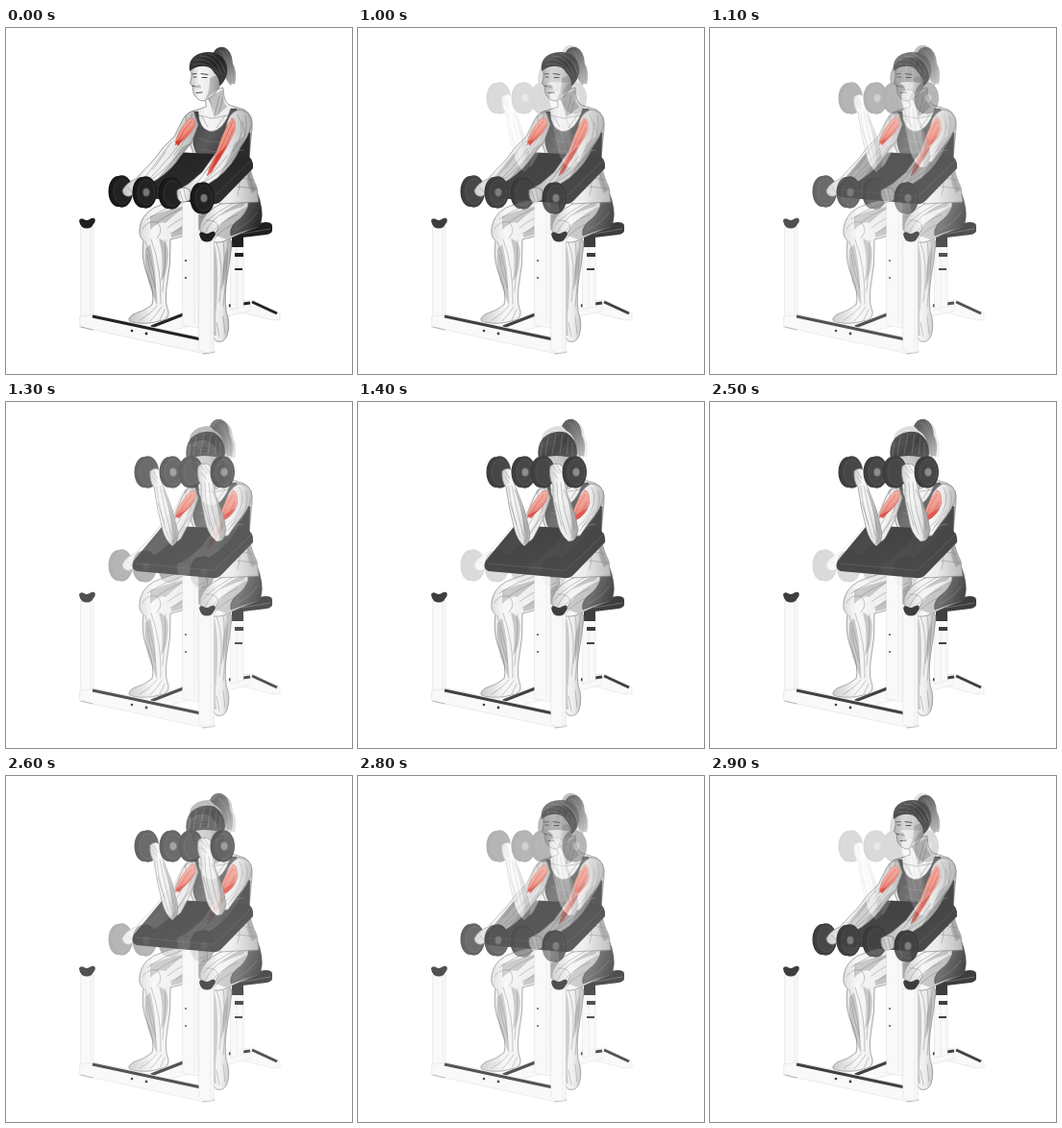
An HTML page for the animation above (3 s loop, 360 by 360 pixels).

```html
<!DOCTYPE html>
<html lang="en">
<head>
<meta charset="utf-8">
<title>Preacher curl</title>
<style>
html, body { margin: 0; width: 100%; height: 100%; overflow: hidden; background: #fff; }
svg { display: block; width: 100%; height: 100%; }
.down { animation: down 3s infinite; }
.up { animation: up 3s infinite; }
/* Six-step crossfade up, five-step crossfade back */
@keyframes down {
  0% { opacity: 1; animation-timing-function: step-end; }
  33.33% { opacity: 1; animation-timing-function: steps(6, start); }
  53.33% { opacity: 0; animation-timing-function: step-end; }
  83.33% { opacity: 0; animation-timing-function: steps(5, start); }
  100% { opacity: .8333; }
}
@keyframes up {
  0% { opacity: 0; animation-timing-function: step-end; }
  33.33% { opacity: 0; animation-timing-function: steps(6, start); }
  53.33% { opacity: 1; animation-timing-function: step-end; }
  83.33% { opacity: 1; animation-timing-function: steps(5, start); }
  100% { opacity: .1667; }
}
path, ellipse, circle { stroke-linecap: round; stroke-linejoin: round; }
.skin { fill: url(#skin); stroke: #777; stroke-width: .7; }
.fibre { fill: none; stroke: #666; stroke-width: .6; opacity: .7; }
.shade { fill: #555; opacity: .32; }
.cloth { fill: url(#cloth); stroke: #333; stroke-width: .5; }
.seam { fill: none; stroke: #777; stroke-width: .6; }
.hair { fill: url(#hair); }
.tail { fill: url(#tailFill); }
.strand { fill: none; stroke: #777; stroke-width: .5; }
.red { fill: url(#red); stroke: #c9584b; stroke-width: .4; }
.redline { fill: none; stroke: #c23c30; stroke-width: .7; opacity: .7; }
.deep { fill: #d33d32; }
.steel { fill: #f8f8f8; stroke: #dcdcdc; stroke-width: .6; }
.rim { fill: none; stroke: #ddd; stroke-width: .6; }
.strip { fill: none; stroke: #222; stroke-width: 3; stroke-linecap: butt; }
.black { fill: #1f1f1f; }
.ink { fill: none; stroke: #333; stroke-width: .9; }
</style>
</head>
<body>
<svg viewBox="0 0 360 360">
<defs>
  <linearGradient id="skin">
    <stop offset="0" stop-color="#c4c4c4"/><stop offset=".3" stop-color="#f6f6f6"/>
    <stop offset=".65" stop-color="#eaeaea"/><stop offset="1" stop-color="#adadad"/>
  </linearGradient>
  <linearGradient id="cloth" x2="1" y2=".5">
    <stop offset="0" stop-color="#3c3c3c"/><stop offset=".45" stop-color="#5c5c5c"/><stop offset="1" stop-color="#2b2b2b"/>
  </linearGradient>
  <linearGradient id="hair" x2="1" y2="1">
    <stop offset="0" stop-color="#444"/><stop offset=".5" stop-color="#222"/><stop offset="1" stop-color="#444"/>
  </linearGradient>
  <linearGradient id="tailFill" x2=".4" y2="1">
    <stop offset="0" stop-color="#333"/><stop offset=".5" stop-color="#666"/><stop offset="1" stop-color="#aaa"/>
  </linearGradient>
  <linearGradient id="red" x2=".4" y2="1">
    <stop offset="0" stop-color="#f4b5a8"/><stop offset=".6" stop-color="#ee8f80"/><stop offset="1" stop-color="#d94d40"/>
  </linearGradient>
  <linearGradient id="pad" x2=".6" y2="1">
    <stop offset="0" stop-color="#222"/><stop offset="1" stop-color="#2e2e2e"/>
  </linearGradient>

  <g id="plate">
    <ellipse cx="-2.5" rx="10" ry="16" fill="#151515"/>
    <ellipse cx="1.5" rx="11.5" ry="16.7" fill="#1b1b1b"/>
    <ellipse cx="2" rx="9" ry="13.3" fill="#222" stroke="#3d3d3d" stroke-width=".7"/>
  </g>
  <g id="capped">
    <use href="#plate"/>
    <ellipse cx="2" rx="3.6" ry="4.3" fill="#777" stroke="#444" stroke-width=".8"/>
  </g>

  <path id="hook" class="black" d="M0 2Q2-1 5 1Q8 3 11 1Q14-1 16 0Q18 3 15 6L13 9Q8 12 3 9L1 6Z"/>

  <g id="seat">
    <path class="steel" d="M238 284L256 283L285 297V303L278 304L238 294Z"/>
    <path class="strip" d="M256 285L282 297"/>
    <path class="steel" d="M150 311L186 297L254 286V294L152 320Z"/>
    <path class="strip" d="M151 311L187 297M232 289L254 286"/>
    <path class="steel" d="M234 222H247V290L234 293Z"/>
    <path class="rim" d="M240 228V291"/>
    <path class="black" d="M235 214H247V228H235ZM238 234H247V238H238ZM238 250H246V252H238Z"/>
    <path class="black" d="M230 208L270 202Q277 202 277 206V211Q276 214 271 215L246 218Q232 218 230 214Z"/>
    <path class="seam" d="M246 214L275 209" stroke="#555"/>
  </g>

  <g id="legs">
    <path class="skin" d="M213 211Q232 210 235 224Q233 243 230 260Q227 279 229 295Q234 308 230 320Q227 328 219 326Q213 321 214 309Q216 292 212 277Q204 250 205 229Z"/>
    <path class="shade" d="M216 222Q222 240 219 290Q217 300 219 320L214 320V222ZM230 228Q232 246 226 270Q223 250 230 228Z"/>
    <path class="fibre" d="M218 220Q228 243 222 285M225 216Q230 240 224 272M231 222Q231 240 226 290M219 306L222 321M226 300L228 318"/>
    <path class="skin" d="M207 171Q175 178 154 187Q140 195 139 209Q138 217 143 221Q140 242 148 259Q155 276 152 288Q145 294 132 298Q125 303 130 306Q147 309 159 305Q170 304 169 295Q165 286 167 270Q172 245 171 220Q191 216 211 204Z"/>
    <path class="shade" d="M150 196Q162 191 190 184Q176 193 166 203Q160 200 150 210ZM159 219Q171 222 168 243Q167 258 161 264Q165 240 159 219ZM150 225Q157 250 156 287L152 275Q143 255 145 230ZM172 214Q190 200 208 190L208 204Q190 214 172 218Z"/>
    <path class="fibre" d="M207 181Q176 188 157 202M207 188Q184 195 168 208M204 196Q186 207 171 214M192 179Q166 186 147 199M142 209Q147 200 157 202Q165 210 157 219M145 222Q155 250 157 287M151 220Q162 249 161 287M166 221Q166 246 163 274M147 236Q149 252 155 270M157 289Q151 297 139 304M162 290Q157 298 150 305M165 293L160 304"/>
    <path class="skin" d="M260 174Q270 194 262 207Q242 214 231 220Q222 225 211 222Q200 218 202 204Q207 191 222 184Q239 174 254 173Z"/>
    <path class="shade" d="M216 215Q224 199 250 186L258 206L229 220ZM222 196Q234 185 252 179L246 186Q234 189 222 196Z"/>
    <path class="fibre" d="M208 212Q214 195 248 180M211 217Q222 201 241 194M205 205Q218 190 246 178M217 219Q225 208 242 202M208 200Q220 199 221 208Q219 216 210 216"/>
    <path class="cloth" d="M249 168Q261 165 264 179Q269 197 263 207Q250 210 234 216Q232 209 239 202Q250 194 252 185Q253 177 249 168Z"/>
    <path class="seam" d="M239 210Q252 205 261 192"/>
  </g>

  <g id="frame">
    <path class="steel" d="M78 207H91V301H78Z"/>
    <path class="rim" d="M88 208V300"/>
    <path class="steel" d="M77 300L92 298L216 325V338L207 339L77 311Z"/>
    <path class="strip" d="M90 300L203 324"/>
    <path class="seam" d="M78 311L90 314M205 339L217 337"/>
    <path class="steel" d="M184 180H200V312L184 309Z"/>
    <path class="rim" d="M196 183V308"/>
    <path class="steel" d="M201 221H216V337L208 338L201 335Z"/>
    <path class="rim" d="M213 222V337"/>
    <g class="black"><circle cx="131" cy="315" r="1.3"/><circle cx="146" cy="318" r="1.4"/><circle cx="187" cy="242" r=".9"/><circle cx="187" cy="260" r=".9"/></g>
    <use href="#hook" x="76" y="198"/>
    <use href="#hook" x="201" y="212"/>
  </g>

  <g id="bench">
    <path d="M162 130Q164 128 168 128.500L250 133Q258 135 257 146L225 179Q221 184 214 183L136 176Q129 173 133 165Z" fill="url(#pad)"/>
    <path d="M135 168L211 175Q217 176 220 172L255 138" fill="none" stroke="#484848" stroke-width=".8"/>
  </g>

  <g id="torso">
    <path class="skin" d="M207 68L226 62Q226 76 232 80L248 85Q257 90 256 104L253 135Q253 150 261 166L263 181L222 183L197 135L185 105Q182 90 196 86L208 82Z"/>
    <path class="shade" d="M209 73L226 64Q225 78 230 82L218 92Q216 82 209 73ZM253 140Q254 155 261 168L256 172Q247 158 253 140Z"/>
    <path class="fibre" d="M211 72L217 92M222 71L217 91M226 72L221 90M196 90L215 94L245 88M204 92L210 103M228 91L219 104M240 139Q246 158 241 174M249 141Q253 158 258 169M236 145L252 149M239 155L257 158M240 165L259 167"/>
    <path class="cloth" d="M196 87L200 87Q200 105 213 108Q227 107 234 84L240 84Q242 105 254 109L253 136Q227 139 200 134Q192 120 196 109Z"/>
    <path class="seam" d="M201 115Q217 123 246 115M204 126Q222 132 247 127"/>
  </g>

  <g id="tail">
    <path class="tail" d="M215 27Q219 18 227 20Q235 23 236 37Q241 46 238 59Q235 56 234 60Q227 54 228 45Q228 36 220 32Z"/>
    <path class="strand" d="M222 24Q233 25 234 56M225 24Q231 37 231 54M228 22Q236 35 237 54"/>
  </g>

  <g id="lowered">
    <use href="#seat"/><use href="#legs"/><use href="#frame"/><use href="#torso"/>
    <use href="#tail"/>
    <path class="skin" d="M194 38Q192 44 193 51L191.500 58L194 60L195 68Q199 76 206 76L216 70L224 58L222 38L204 32Z"/>
    <path class="shade" d="M212 52L222 48L222 62L207 75Q213 64 212 52ZM198 60L202 59L203 63L198 62Z"/>
    <path class="ink" d="M194 48L198 47.500M203 47.500L210 48.500M195 51L198 51M204 51.500L209 51.500M194 60L197 61M198 67.500L204 67"/>
    <path class="hair" d="M191 45Q189 32 200 27Q214 22 225 30Q233 40 229 51Q226 58 222 60Q222 51 217 47Q214 41 208 40Q198 39 191 45Z"/>
    <path class="strand" d="M197 33Q213 30 222 49M202 29Q218 28 225 49M195 38Q210 34 219 46M210 26Q224 31 228 46"/>
    <use href="#bench"/>
    <use href="#plate" x="119" y="170"/>
    <path class="skin" d="M195 86Q186 88 181 101L175 113Q163 123 154 137L135 157Q125 161 121 169Q122 176 129 175L138 169L158 157Q173 147 181 134L193 119L200 101Z"/>
    <path class="shade" d="M195 118L181 134Q172 148 158 157Q172 140 183 124Z"/>
    <path class="fibre" d="M187 91Q190 106 180 120M193 90Q194 110 175 132M172 119L139 163M178 124Q163 144 141 165M181 130Q165 148 145 163M166 129L153 147M127 166L132 172"/>
    <path class="red" d="M190 95Q196 92 197 99Q194 110 184 117L176 122Q177 108 190 95Z"/>
    <path class="redline" d="M193 97Q183 107 179 119M196 101Q188 111 182 117"/>
    <path class="deep" d="M176 118L184 116L179 123Z"/>
    <path class="skin" d="M242 85Q256 86 256 100Q252 114 244 124Q237 142 220 156L200 169Q191 179 182 179Q177 175 180 168L190 162L204 150L219 129L229 104Q231 88 242 85Z"/>
    <path class="shade" d="M248 112L243 126Q236 143 220 156Q231 138 238 120Z"/>
    <path class="fibre" d="M241 90Q252 107 236 129M249 91Q254 114 237 135M246 98L249 112M222 131L196 165M230 133Q218 150 199 165M236 135Q225 150 205 161M217 137L206 151M182 170L188 174M185 167L191 171"/>
    <path class="red" d="M235 94Q240 94 238 107L231 122L214 150L209 154Q212 142 219 130Q225 109 235 94Z"/>
    <path class="redline" d="M236 97Q229 113 217 140M237 104Q231 119 222 134"/>
    <path class="deep" d="M219 133L230 122L222 136L212 150Z"/>
    <use href="#capped" x="144" y="171"/>
    <use href="#plate" x="171" y="172"/>
    <path class="skin" d="M178 169Q183 164 191 168L194 175Q191 182 182 181Q177 178 178 169Z"/>
    <path class="fibre" d="M181 170L184 180M185 168L188 180"/>
    <use href="#capped" x="204" y="177"/>
  </g>

  <g id="raised">
    <use href="#seat"/><use href="#legs"/><use href="#frame"/><use href="#torso"/>
    <use href="#tail" transform="translate(-3 -2)"/>
    <path class="skin" d="M191 50L193 65Q199 76 207 74L224 64L224 45Z"/>
    <path class="shade" d="M192 57H223L222 65L207 74L194 66Z"/>
    <path class="hair" d="M188 60Q185 46 193 37Q204 28 217 32Q228 39 228 53Q228 59 223 63Q223 58 218 57Q202 55 192 58Z"/>
    <path class="strand" d="M192 42L190 56M198 36L195 55M206 33L202 54M213 33L210 54M219 37L217 55M223 42L223 57"/>
    <use href="#bench"/>
    <path class="skin" d="M196 87Q186 90 181 104L173 123L169 140Q175 150 182 142L192 123L200 100Z"/>
    <path class="fibre" d="M187 93Q190 112 174 133M194 91Q197 112 178 138M192 118L176 142"/>
    <path class="red" d="M192 93Q199 90 197 99Q193 112 176 121Q177 108 192 93Z"/>
    <path class="redline" d="M193 97Q184 107 179 119M196 102Q189 112 181 119"/>
    <path class="deep" d="M176 118L188 112L180 121Z"/>
    <use href="#plate" x="146" y="73"/>
    <path class="skin" d="M150 72Q156 66 162 73L163 86L173 112L177 128Q182 144 173 150Q166 144 163 133L158 112L154 89Q149 82 150 72Z"/>
    <path class="shade" d="M163 88L173 112L177 130Q179 143 173 149Q174 122 163 88Z"/>
    <path class="fibre" d="M157 88Q159 113 169 141M160 87Q165 112 172 139M163 91Q172 113 174 135M158 105L165 127M153 72L158 80M153 77L157 84"/>
    <use href="#capped" x="172" y="73"/>
    <path class="skin" d="M242 85Q256 86 256 98Q252 113 240 126L231 139Q219 141 217 127L227 111Q230 91 242 85Z"/>
    <path class="fibre" d="M243 89Q253 108 229 130M250 93Q256 112 234 129M246 112L231 134"/>
    <path class="red" d="M236 92Q241 91 241 105Q237 120 223 124Q222 110 236 92Z"/>
    <path class="redline" d="M236 97Q227 109 225 121M238 104Q233 117 227 121"/>
    <path class="deep" d="M223 120L239 110Q233 122 223 124Z"/>
    <use href="#plate" x="192" y="73"/>
    <path class="skin" d="M200 67Q206 61 213 67L215 82L217 94L226 118L229 133Q227 146 219 145Q209 137 207 122L203 103L203 87Q198 78 200 67Z"/>
    <path class="shade" d="M216 92L226 118L229 134Q227 143 222 143Q224 118 216 92Z"/>
    <path class="fibre" d="M207 84Q207 112 217 138M211 84Q213 112 222 137M214 91Q224 112 225 132M205 104L212 129M203 67L209 74M206 64L211 73M203 73L208 80"/>
    <use href="#capped" x="225" y="73"/>
  </g>
</defs>
<use class="down" href="#lowered"/>
<use class="up" href="#raised"/>
</svg>
</body>
</html>
```
